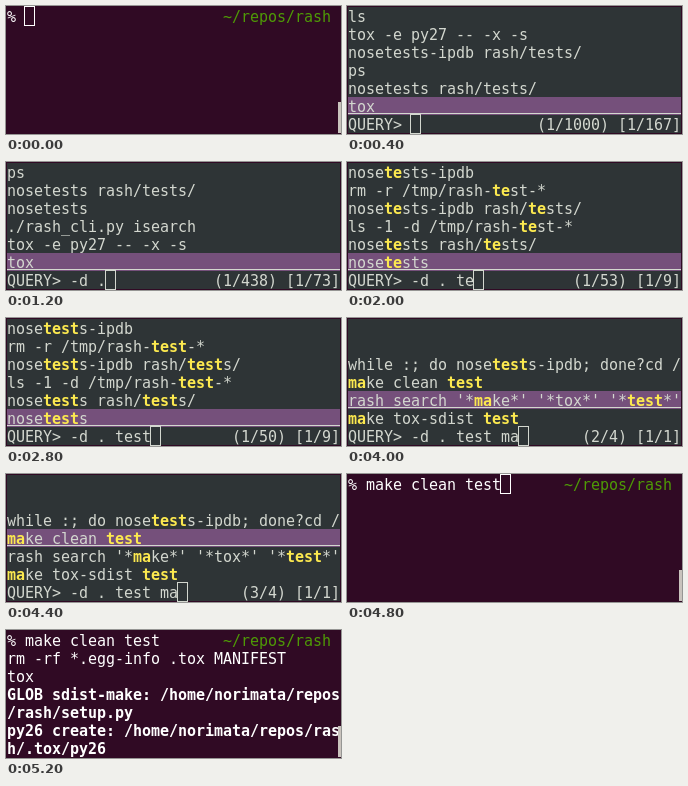
An HTML page that plays this animation: 335x128 px, repeating every 5600 ms.

```html
<!DOCTYPE html>
<html lang="en">
<head>
<meta charset="utf-8">
<title>Shell history search</title>
<style>
  html, body { margin: 0; width: 100%; height: 100%; overflow: hidden; background: #300a24; }
  #term {
    position: absolute; left: 0; top: 0; width: 335px; height: 128px; overflow: hidden;
    background: #300a24; color: #fff;
    font: 15px/20px "DejaVu Sans Mono", monospace;
    letter-spacing: calc(9px - 1ch); font-variant-ligatures: none;
  }
  #term.search { color: #d3d7cf; }
  #screen { position: absolute; left: 1px; top: 1px; width: 333px; height: 126px; }
  .search #screen { background: #2e3436; }
  .row { position: absolute; left: 0; width: 333px; height: 18px; white-space: pre; }
  .selected { background: linear-gradient(#d3d7cf, #d3d7cf) 0 16px / 100% 1px no-repeat #75507b; }
  .row b { color: #fce94f; }
  .bold { font-weight: bold; }
  .path { position: absolute; left: 216px; top: 0; color: #4e9a06; }
  #cursor { position: absolute; width: 11px; height: 20px; box-sizing: border-box; border: 1px solid; }
  #scroll { position: absolute; left: 332px; top: 96px; width: 3px; height: 31px; background: #c9c3bd; }
</style>
</head>
<body>
<div id="term">
  <div id="screen"></div>
  <div id="cursor"></div>
  <div id="scroll"></div>
</div>
<script>
const STEP = 400, COLS = 37, ROWS = 7, CELL_W = 9, CELL_H = 18;
const [term, screenBox, cursor, scroll] =
  ['term', 'screen', 'cursor', 'scroll'].map(id => document.getElementById(id));

// History lists, top row first.
const all = ['ls', 'tox -e py27 -- -x -s', 'nosetests-ipdb rash/tests/', 'ps', 'nosetests rash/tests/', 'tox'];
const dashD = ['ls -1 -d /tmp/rash-test-*', 'nosetests-ipdb', 'ps', 'nosetests rash/tests/', 'tox -e py27 -- -x -s', 'tox'];
const here = ['ps', 'nosetests rash/tests/', 'nosetests', './rash_cli.py isearch', 'tox -e py27 -- -x -s', 'tox'];
const withT = ['nosetests-ipdb rash/tests/', 'ls -1 -d /tmp/rash-test-*', 'nosetests rash/tests/', 'nosetests', 'tox -e py27 -- -x -s', 'tox'];
const tests = ['nosetests-ipdb', 'rm -r /tmp/rash-test-*', 'nosetests-ipdb rash/tests/', 'ls -1 -d /tmp/rash-test-*', 'nosetests rash/tests/', 'nosetests'];
const makes = ['while :; do nosetests-ipdb; done?cd /', 'make clean test', "rash search '*make*' '*tox*' '*test*'", 'make tox-sdist test'];
const withM = [...makes, 'rm -r /tmp/rash-test-*', 'ls -1 -d /tmp/rash-test-*'];

// A leading * marks a bold line.
const output = [
  'rm -rf *.egg-info .tox MANIFEST', 'tox',
  '*GLOB sdist-make: /home/norimata/repos', '*/rash/setup.py',
  '*py26 create: /home/norimata/repos/ras', '*h/.tox/py26'
];

const scenes = [
  () => shell(''),
  () => search('', all, 1000),
  () => search('-d', dashD, 732),
  () => search('-d .', here, 438),
  () => search('-d . t', withT, 236),
  () => search('-d . te', tests, 53),
  () => search('-d . tes', tests, 52),
  () => search('-d . test', tests, 50),
  () => search('-d . test m', withM, 12),
  () => search('-d . test ma', makes, 4),
  () => search('-d . test ma', makes, 4, 2),
  () => search('-d . test ma', makes, 4, 3),
  () => shell('make clean test'),
  () => shell('make clean test', output)
];

const escapeHtml = s => s.replace(/&/g, '&amp;').replace(/</g, '&lt;').replace(/>/g, '&gt;');
const row = (y, html, cls = '') => `<div class="row ${cls}" style="top:${y * CELL_H}px">${html}</div>`;

function show(html, searching, cursorCol, cursorRow) {
  screenBox.innerHTML = html;
  term.className = searching ? 'search' : '';
  scroll.hidden = searching;
  cursor.hidden = cursorCol < 0;
  cursor.style.left = cursorCol * CELL_W + 'px';
  cursor.style.top = cursorRow * CELL_H + 'px';
}

function shell(command, lines = []) {
  const prompt = row(0, `% ${command}<span class="path">~/repos/rash</span>`);
  const printed = lines.map((line, i) =>
    line[0] === '*' ? row(i + 1, line.slice(1), 'bold') : row(i + 1, line));
  show(prompt + printed.join(''), false, lines.length ? -1 : 2 + command.length, 0);
}

function search(query, list, total, pick = 1) {
  const words = query.split(' ').slice(2).filter(Boolean);
  const mark = line => words.length
    ? escapeHtml(line).replace(new RegExp(words.join('|'), 'g'), '<b>$&</b>')
    : escapeHtml(line);
  const first = ROWS - 1 - list.length;
  const rows = list.map((line, i) =>
    row(first + i, mark(line), i === list.length - pick ? 'selected' : ''));
  const prompt = 'QUERY> ' + query;
  const status = `(${pick}/${total}) [1/${Math.ceil(total / 6)}]`;
  rows.push(row(ROWS - 1, escapeHtml(prompt + status.padStart(COLS - prompt.length))));
  show(rows.join(''), true, prompt.length, ROWS - 1);
}

let shown = -1;
const start = performance.now();
function tick() {
  const step = Math.floor(Math.max(0, performance.now() - start) / STEP) % scenes.length;
  if (step !== shown) scenes[shown = step]();
  requestAnimationFrame(tick);
}
tick();
</script>
</body>
</html>
```
